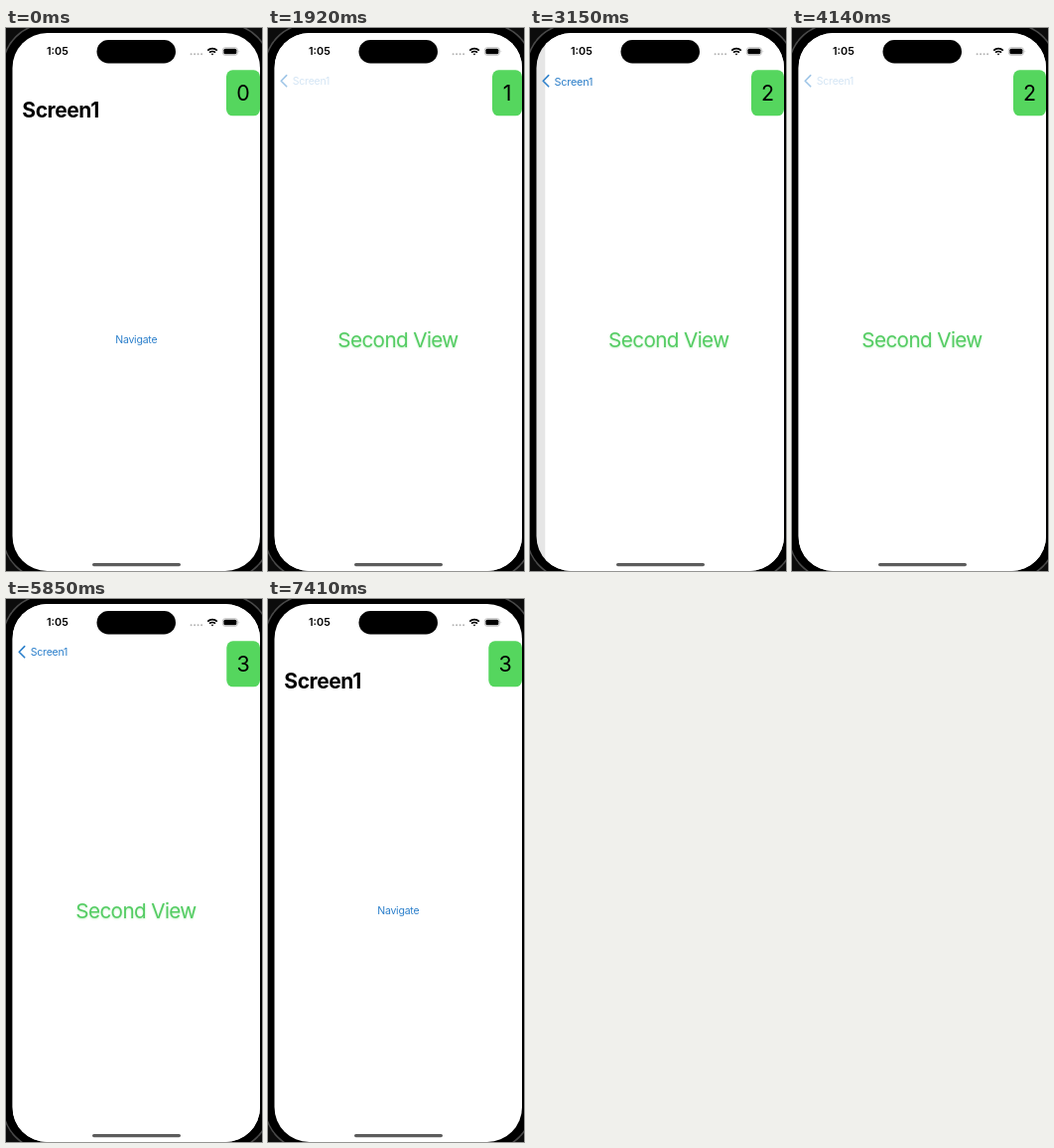
Recreate the animation shown at these times as an HTML page. Size 258x546 px, loop 8010 ms.

```html
<!DOCTYPE html>
<html lang="en">
<head>
<meta charset="utf-8">
<title>Screen navigation</title>
<style>
  html, body { margin: 0; width: 100%; height: 100%; overflow: hidden; background: #000; }
  svg { display: block; width: 100vw; height: 100vh; font-family: Inter, sans-serif; }
  .large { font-size: 20.7px; letter-spacing: -.03em; }
  .body { font-size: 10.5px; letter-spacing: -.02em; fill: #2b7fcb; }
  .title { font-size: 21px; font-weight: 700; letter-spacing: -.02em; }
  .mid { text-anchor: middle; }
</style>
</head>
<body>
<svg viewBox="0 0 258 546">
  <defs>
    <clipPath id="glass"><rect x="6.5" y="5" width="249.5" height="541" rx="35"/></clipPath>
  </defs>

  <!-- phone body -->
  <rect width="258" height="546" fill="#0c0c0c"/>
  <rect x="-3" y="-4" width="269" height="558" rx="44" stroke="#4a4a4a" stroke-width="1.5"/>

  <g clip-path="url(#glass)">
    <rect width="258" height="546" fill="#fff"/>
    <g id="first">
      <text id="link" class="body mid" x="131.3" y="316.5">Navigate</text>
    </g>
    <rect id="dim" width="258" height="546"/>
    <g id="second">
      <rect x="6.5" width="252" height="546" fill="#fff"/>
      <text class="large mid" x="131" y="320.5" fill="#54cc63"
        style="text-shadow: 0 1px 2px #55d65e55">Second View</text>
    </g>

    <!-- navigation bar -->
    <text id="title" class="title">Screen1</text>
    <text id="back" class="body">Screen1</text>
    <path id="chevron" d="M18.7 47.6 13.2 53.2 18.7 58.8" fill="none" stroke="#2b7fcb"
      stroke-width="1.6" stroke-linecap="round" stroke-linejoin="round"/>

    <!-- status bar -->
    <text x="41" y="27.4" font-size="10.8" font-weight="600">1:05</text>
    <rect x="91.5" y="12" width="79.5" height="23.5" rx="11.75"/>
    <path d="M186.6 26.3h12" stroke="#b5b5b5" stroke-width="2" stroke-linecap="round" stroke-dasharray="0 3.5"/>
    <g fill="none" stroke="#000" stroke-width="1.7">
      <path d="M203.2 22.6a6.8 6.8 0 0 1 9.6 0M205 24.7a4.3 4.3 0 0 1 6 0"/>
      <path d="M206.6 25.8 208 27.4 209.4 25.8Z" fill="#000" stroke="none"/>
    </g>
    <rect x="218.4" y="19.7" width="15" height="7.6" rx="2.4" fill="#fff" stroke="#aaa" stroke-width=".7"/>
    <rect x="219.4" y="20.7" width="13" height="5.6" rx="1.5"/>
    <path d="M234.6 22.3q1.3 1.2 0 2.4z" fill="#aaa"/>

    <rect id="badge" y="42.3" height="46" rx="6.5" fill="#55d65e"/>
    <text id="count" class="large mid" y="73.3" style="font-size: 21.4px; letter-spacing: 0"></text>

    <rect x="87" y="538" width="89" height="3.2" rx="1.6" fill="#5c5c5c"/>
  </g>
</svg>
<script>
const LOOP = 8010, WIDTH = 249.5;
const BADGE = [34, 30, 33, 33.7];

// start, time the press is held, end; pushes and pops alternate
const MOVES = [
  [750, 30, 1290], [1920, 60, 2430], [2880, 30, 3330],
  [4140, 90, 4680], [5370, 30, 5850], [6870, 90, 7410]
];

const el = id => document.getElementById(id);
const set = (id, attrs) => {
  for (const k in attrs) el(id).setAttribute(k, attrs[k]);
};
const mix = (a, b, p) => a + (b - a) * p;
const slide = x => `translate(${x} 0)`;

// critically damped spring, settled at u = 1
const spring = u => u <= 0 ? 0 : u >= 1 ? 1 : 1 - (1 + 9 * u) * Math.exp(-9 * u);

function draw(t) {
  const i = MOVES.findLastIndex(m => t >= m[0]);
  const pushing = i % 2 === 0;
  let e = 1;
  if (i >= 0) {
    const [start, hold, end] = MOVES[i];
    e = spring((t - start - hold) / (end - start - hold));
  }
  const p = pushing ? e : 1 - e;      // 0 = first screen, 1 = second
  const pressed = mix(.2, 1, e);
  const backPress = pushing ? 1 : pressed;
  const count = Math.ceil((i + 1) / 2);

  set('first', { transform: slide(-.3 * WIDTH * p) });
  set('link', { opacity: pushing ? pressed : 1, x: pushing && e < 1 ? 130.8 : 131.3 });
  set('dim', { opacity: .1 * p });
  set('second', { transform: slide(WIDTH * (1 - p)) });

  // large title and back label trade places
  const at = `translate(${mix(16.3, 24.8, p)} ${mix(90, 57, p)})`;
  set('title', { transform: `${at} scale(${mix(1, .48, p)})`, opacity: 1 - p });
  set('back', { transform: `${at} scale(${mix(2.08, 1, p)})`, opacity: p * backPress });
  set('chevron', { opacity: p * (pushing ? 1 : mix(.45, 1, e)) });

  const w = BADGE[count];
  set('badge', { x: 256 - w, width: w });
  set('count', { x: 256 - w / 2 });
  el('count').textContent = count;
}

const t0 = performance.now();
function tick() {
  draw((performance.now() - t0) % LOOP);
  requestAnimationFrame(tick);
}
tick();
</script>
</body>
</html>
```
